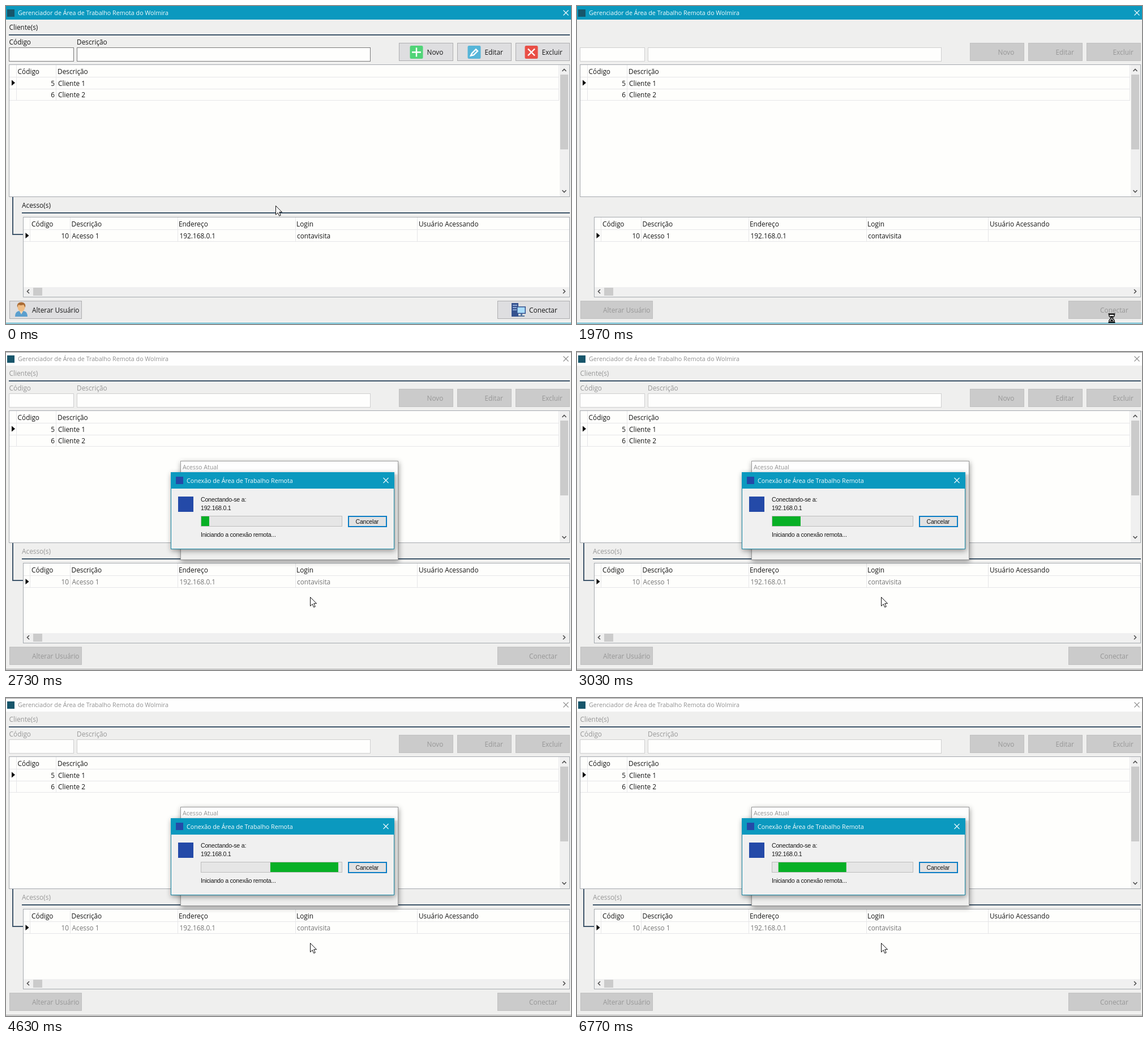
Recreate the animation shown at these times as an HTML page. Size 998x561 px, loop 6.81 s.

```html
<!DOCTYPE html>
<html lang="pt">
<head>
<meta charset="utf-8">
<title>Gerenciador</title>
<style>
html, body { margin: 0; width: 100%; height: 100%; overflow: hidden; background: #efefee; }
svg { display: block; width: 998px; height: 561px; }
text { font: 11.85px "Open Sans", "Noto Sans", sans-serif; fill: #161616; white-space: pre; }
.cap { font-size: 10.7px; fill: #f3fbfd; }
.small { font: 10.6px "Liberation Sans", Arial, sans-serif; letter-spacing: -.22px; }
.end { text-anchor: end; }
.bar { fill: #0b99bf; }
.close { stroke: #eefafd; stroke-width: 1.2; fill: none; }
.rule { fill: #3f566b; }
.field { fill: #fefefd; stroke: #7a7a7a; }
.btn { fill: #dedee0; stroke: #aeaeb0; }
.grid { fill: #fefefc; stroke: #a5a9ae; }
.line { fill: #e6e6e8; }
.track { fill: #f0f0f0; }
.thumb { fill: #cbcbcb; }
.arrow { fill: none; stroke: #505050; stroke-width: 1.6; }
.shadow { filter: drop-shadow(1px 3px 5px #0006); }

.dis .main .field { stroke: #cfcfcf; }
.dis .main .btn { fill: #cbcbcb; stroke: #c0c0c0; }
.dis .main .label, .dis .main .btnText { fill: #979797; }
.dis .main .icon, .blank .label, .blank .rule { display: none; }
.off .main .bar { fill: #fefefe; }
.off .main .cap, .off .child .cap { fill: #929292; }
.off .main .close { stroke: #929292; }
.off .main .edge { fill: #9b9b9b; }
.off .row { fill: #757575; }
</style>
</head>
<body>
<svg id="stage" viewBox="0 0 998 561"></svg>
<script>
const stage = document.getElementById('stage');

// Outlined classes are inset so that the line lies inside the box.
const box = (x, y, w, h, cls, extra = '') => {
  const inset = /field|btn|grid|outline/.test(cls) ? .5 : 0;
  return `<rect x="${x + inset}" y="${y + inset}" width="${w - 2 * inset}" height="${h - 2 * inset}" class="${cls}" ${extra}/>`;
};
const text = (x, baseline, str, cls = '') => `<text x="${x}" y="${baseline}" class="${cls}">${str}</text>`;
const path = (d, extra) => `<path d="${d}" ${extra}/>`;
const group = (cls, ...parts) => `<g class="${cls}">${parts.join('')}</g>`;
const close = (x, y) => path(`M${x - 4.5} ${y - 4.5}l9 9m0-9l-9 9`, 'class="close"');
const arrow = (x, y, turn) =>
  path('M-3.5 2L0-1.5 3.5 2', `class="arrow" transform="translate(${x} ${y}) rotate(${turn})"`);
const marker = (x, y) => path(`M${x} ${y - 5}l6 5-6 5z`, '');
const button = (x, y, w, h, label, tx, icon) =>
  box(x, y, w, h, 'btn') + group('icon', icon) + text(tx, y + h / 2 + 5, label, 'btnText');
const tile = (x, color, mark) =>
  box(x, 70, 23, 23, '', `rx="2.5" fill="${color}"`) +
  path(mark, `transform="translate(${x + 11.5} 81.5)" fill="none" stroke="#fff" stroke-width="2.4"`);

const person =
  path('M16 548q0-9 7-10h8q7 1 7 10z', 'fill="#5b9fce"') +
  path('M23 537h8l-4 7z', 'fill="#f4d8b4"') +
  '<ellipse cx="27" cy="531" rx="6.5" ry="8" fill="#efbd86"/>' +
  path('M20 532q-2-9 7-9.5 9 .5 7 9.5l-3-5q-5 2-9 0z', 'fill="#a96b35"');
const computer =
  box(893, 524, 12, 24, '', 'fill="#35528f"') +
  path('M895 528h8m-8 4h8m-8 4h8', 'stroke="#a9c3ea" stroke-width="1.3"') +
  box(902, 530, 16, 13, '', 'fill="#34518d"') +
  box(903.5, 531.5, 13, 10, '', 'fill="#a9dcfa"') +
  path('M909 543h3v3h4v2h-11v-2h4z', 'fill="#58779f"');
const padlock =
  path('M580 331v-4q0-6 6-6t6 6v4', 'fill="none" stroke="#b9b9b2" stroke-width="2.6"') +
  box(575.5, 329, 21, 13, '', 'rx="2" fill="#efbd24"') +
  path('M578 337h16', 'stroke="#75510b" stroke-width="2" stroke-dasharray="2 2.5"');

const clients = group('',
  box(5, 103, 991, 234, 'grid'),
  [125, 146, 166].map(y => box(6, y, 971, 1, 'line')).join(''),
  box(18, 104, 1, 63, 'line'), box(88, 104, 1, 63, 'line'), box(976, 104, 1, 63, 'line'),
  box(978, 104, 17, 232, 'track'), box(979, 121, 14, 132, 'thumb'),
  arrow(986, 113, 0), arrow(986, 327, 180), marker(10, 135.5),
  text(20.5, 120, 'Código'), text(91, 120, 'Descrição'),
  text(86, 141, '5', 'end'), text(92, 141, 'Cliente 1'),
  text(86, 161, '6', 'end'), text(92, 161, 'Cliente 2'));

const columns = [[45, 'Código'], [115.5, 'Descrição'], [305, 'Endereço'], [513, 'Login'], [729, 'Usuário Acessando']];
const accesses = group('',
  box(30, 372, 966, 142, 'grid'),
  box(31, 394, 964, 1, 'line'), box(31, 415, 964, 1, 'line'),
  [42, 113, 303, 511, 726].map(x => box(x, 373, 1, 42, 'line')).join(''),
  box(31, 496, 964, 17, 'track'), box(48, 497, 16, 14, 'thumb'),
  arrow(39, 503.5, -90), arrow(986, 503.5, 90), marker(34.5, 405),
  columns.map(([x, s]) => text(x, 389, s)).join(''),
  text(111, 410, '10', 'end row'), text(116.5, 410, 'Acesso 1', 'row'),
  text(306.5, 410, '192.168.0.1', 'row'), text(514, 410, 'contavisita', 'row'));

const main = group('main',
  box(0, 0, 998, 24, 'bar'), box(0, 0, 998, 1, 'edge bar'), box(0, 559, 998, 1, 'edge bar'),
  box(2, 6, 13, 13, '', 'fill="#17566b"'),
  text(21, 16, 'Gerenciador de Área de Trabalho Remota do Wolmira', 'cap'), close(989, 12),
  text(5.5, 42, 'Cliente(s)', 'label'), box(5, 50, 991, 2, 'rule'),
  text(5.5, 68, 'Código', 'label'), text(125, 68, 'Descrição', 'label'),
  box(5, 73, 115, 25, 'field'), box(125, 73, 519, 25, 'field'),
  button(694, 65, 96, 32, 'Novo', 743.5, tile(713.5, '#50d477', 'M0-8V8M-8 0H8')),
  button(797, 65, 96, 32, 'Editar', 845.5, tile(815.5, '#56b5d8', 'M-6 6l2-4 7-7 3 3-7 7-5 1z')),
  button(900, 65, 96, 32, 'Excluir', 946.5, tile(916.5, '#e94f46', 'M-6-6L6 6M6-6L-6 6')),
  clients,
  box(11, 337, 2, 67, 'rule'), box(11, 402, 19, 2, 'rule'),
  text(28, 356, 'Acesso(s)', 'label'), box(28, 364, 968, 2, 'rule'),
  accesses,
  button(6, 520, 128, 32, 'Alterar Usuário', 46, person),
  button(868, 520, 128, 32, 'Conectar', 924, computer));

const dots = [0, 1, 2, 3, 4].map(i => `<circle cx="${323.3 + 7.4 * i}" cy="331.5" r="3"/>`).join('');
const login = group('child',
  group('shadow', box(308, 192, 385, 175, 'outline', 'fill="#efefee" stroke="#9a9a9a"')),
  box(309, 193, 383, 23, '', 'fill="#fefefe"'),
  text(312, 207, 'Acesso Atual', 'cap'),
  '<g id="form">',
  text(316, 233, 'Cliente 1 - Acesso 1'), box(316, 241, 369, 2, 'rule'),
  text(316, 259, 'Login'),
  box(316, 268, 369, 24, 'field', 'style="stroke:#4f93c4"'), text(319, 284, 'contavisita'),
  text(316, 310, 'Senha'), box(316, 318, 235, 25, 'field'), dots,
  button(558, 315, 126, 32, 'Exibir Senha', 604.5, padlock),
  '</g>');

const connect = group('',
  group('shadow', box(291, 212, 395, 136, 'outline', 'fill="#f0f0f0" stroke="#1687a5"')),
  box(291, 212, 395, 29, 'bar'),
  box(300, 220, 13, 13, '', 'fill="#244aa8"'),
  text(319, 231, 'Conexão de Área de Trabalho Remota', 'cap'), close(671, 226.5),
  box(304, 255, 27, 27, '', 'fill="#244aa8"'),
  text(344, 264, 'Conectando-se a:', 'small'), text(344, 279, '192.168.0.1', 'small'),
  box(344, 289, 250, 19, 'outline', 'fill="#e6e6e6" stroke="#bdbdbd"'),
  '<rect id="progress" y="290" height="17" fill="#08b026"/>',
  box(605, 290, 67, 18, '', 'fill="#e2e2e2" stroke="#0a7cc4" stroke-width="2"'),
  text(617.5, 303, 'Cancelar', 'small'),
  text(344, 326, 'Iniciando a conexão remota...', 'small'));

const pointer = path('M.5.5V16.2L4.2 12.7 6.7 18.3 9.2 17.2 6.7 11.7H11.5Z',
  'id="pointer" fill="#fff" stroke="#111"');
const hourglass = '<g id="hourglass" transform="translate(938 542)">' +
  path('M2 2H11V5L7.5 8.5 11 12.5V16H2V12.5L5.5 8.5 2 5Z', 'fill="#fff" stroke="#111" stroke-width="1.5"') +
  path('M3.5 5H9.5L6.5 8ZM6.5 10L10 14.5H3Z', '') +
  path('M.5 1.2H12.5M.5 16.3H12.5', 'stroke="#111" stroke-width="2"') + '</g>';

stage.innerHTML = box(0, 0, 998, 561, '', 'fill="#efefee"') + main +
  `<g id="login">${login}</g><g id="connect">${connect}</g>` + pointer + hourglass;

const LOOP = 6810, CLICK = 1700, LOGIN = 2130, CONNECT = 2615;
const trail = [[0, 476, 352], [150, 476, 352], [830, 880, 520], [1200, 944, 541],
  [2050, 944, 541], [2370, 577, 454], [2560, 537, 432], [LOOP, 537, 432]];
const el = id => document.getElementById(id);
const show = (id, on) => el(id).style.display = on ? '' : 'none';

function pointerAt(t) {
  const i = trail.findIndex(k => k[0] > t);
  const [t0, x0, y0] = trail[i - 1], [t1, x1, y1] = trail[i];
  const u = (t - t0) / (t1 - t0), e = u * u * (3 - 2 * u);
  return [x0 + (x1 - x0) * e, y0 + (y1 - y0) * e].map(Math.round);
}

function draw() {
  const t = performance.now() % LOOP;
  const waiting = t >= CLICK && t < 2050;
  stage.setAttribute('class', [t >= CLICK && 'dis', t >= CLICK && t < LOGIN && 'blank',
    t >= LOGIN && 'off'].filter(Boolean).join(' '));
  show('login', t >= LOGIN);
  show('form', t < CONNECT);
  show('connect', t >= CONNECT);
  show('hourglass', waiting);
  show('pointer', !waiting);
  el('pointer').setAttribute('transform', `translate(${pointerAt(t)})`);

  // A 120 px block crosses the 248 px track and starts again once it has left.
  const head = Math.max(0, t - CONNECT) * .12 % 368;
  const left = Math.max(0, head - 120), right = Math.min(248, head);
  el('progress').setAttribute('x', 345 + left);
  el('progress').setAttribute('width', Math.max(0, right - left));
  requestAnimationFrame(draw);
}
draw();
</script>
</body>
</html>
```
